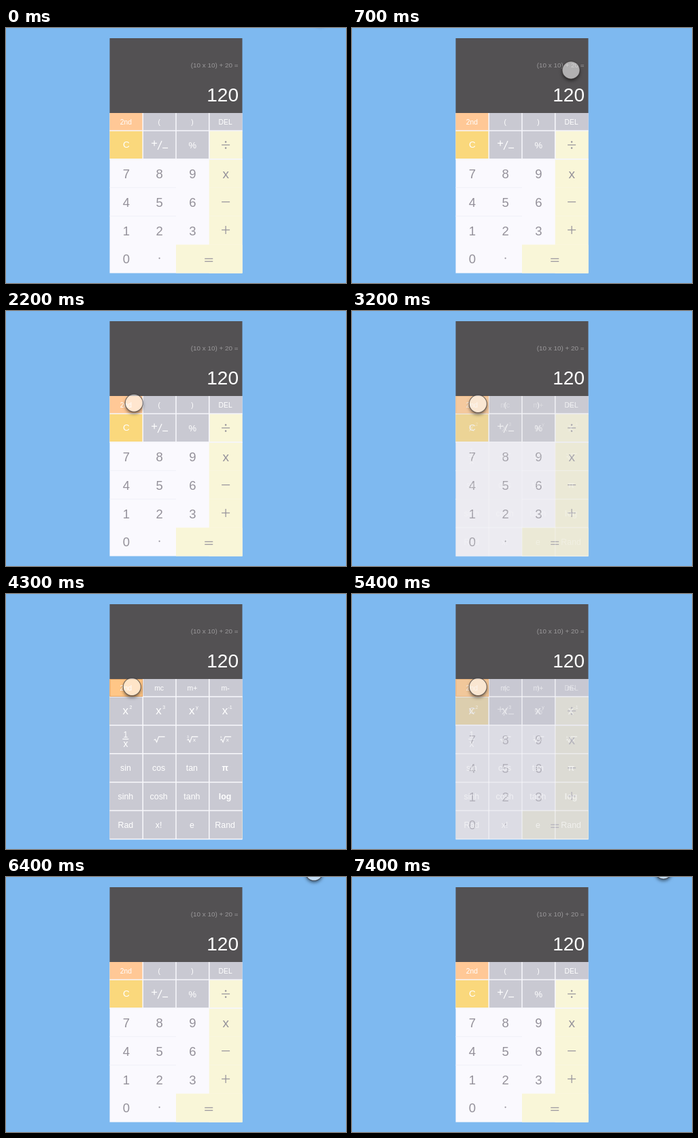
These frames come from a looping animation (500x375 px, 7.5 s). An HTML page with a canvas:

```html
<!DOCTYPE html>
<html lang="en">
<head>
<meta charset="utf-8">
<title>Calculator</title>
<style>
html, body { margin: 0; height: 100%; overflow: hidden; background: #7eb9f0; }
canvas { display: block; }
</style>
</head>
<body>
<canvas id="stage" width="500" height="375"></canvas>
<script>
const ctx = document.getElementById('stage').getContext('2d');
const LOOP = 7500, STEP = 100;
const SKY = '#7eb9f0', SCREEN = '#535153', GREY = '#c9c9d2', ORANGE = '#ffc896';
const GOLD = '#fad87c', YELLOW = '#f9f6d8', PALE = '#faf9fe', INK = '#94919a', WHITE = '#fff';

// Keypad grid: four equal columns, a low first row and five tall rows
const LEFT = 152.5, RIGHT = 347.5, TOP = 125, BOTTOM = 360.5;
const colX = c => LEFT + c * (RIGHT - LEFT) / 4;
const rowY = r => r ? 151 + (r - 1) * (BOTTOM - 151) / 5 : TOP;
const midX = c => colX(c + 0.5);
const midY = r => (rowY(r) + rowY(r + 1)) / 2;

function box(x, y, right, bottom, color) {
  ctx.fillStyle = color;
  ctx.fillRect(x, y, right - x, bottom - y);
}

const cell = (c, r, color, cols = 1) => box(colX(c), rowY(r), colX(c + cols), rowY(r + 1), color);

function label(text, x, y, size, color = WHITE, weight = 400, align = 'center') {
  ctx.font = `${weight} ${size}px "Liberation Sans", Arial, sans-serif`;
  ctx.textAlign = align;
  ctx.fillStyle = color;
  ctx.fillText(text, x, y + size * 0.355);
}

// Each path is a polyline: [x, y, x, y, ...]
function lines(color, width, ...paths) {
  ctx.strokeStyle = color;
  ctx.lineWidth = width;
  ctx.beginPath();
  for (const p of paths)
    for (let i = 0; i < p.length; i += 2) ctx[i ? 'lineTo' : 'moveTo'](p[i], p[i + 1]);
  ctx.stroke();
}

function dot(x, y, r, color) {
  ctx.fillStyle = color;
  ctx.beginPath();
  ctx.arc(x, y, r, 0, 7);
  ctx.fill();
}

const dash = (x, y, half = 6, color = INK) => lines(color, 1.2, [x - half, y, x + half, y]);

function plus(x, y, half = 6, color = INK) {
  dash(x, y, half, color);
  lines(color, 1.2, [x, y - half, x, y + half]);
}

function gridLines(color, width, firstRow, lastRow) {
  for (let c = 1; c < 4; c++) lines(color, width, [colX(c), rowY(firstRow), colX(c), rowY(lastRow)]);
  for (let r = firstRow + 1; r <= lastRow; r++) lines(color, width, [LEFT, rowY(r), RIGHT, rowY(r)]);
}

function drawScreen() {
  box(0, 0, 500, 375, SKY);
  box(LEFT, 15, RIGHT, TOP, SCREEN);
  label('(10 x 10) + 20 =', 341.5, 54.5, 9.9, '#9b999b', 400, 'right');
  label('120', 342, 98, 28, WHITE, 400, 'right');
}

function drawBasicKeys() {
  box(LEFT, TOP, RIGHT, BOTTOM, PALE);
  for (let c = 0; c < 4; c++) {
    cell(c, 0, c ? GREY : ORANGE);
    cell(c, 1, c ? GREY : GOLD);
  }
  for (let r = 1; r < 6; r++) cell(3, r, YELLOW);
  cell(2, 5, YELLOW, 2);
  gridLines('#f6f6fb', 1.6, 0, 2);
  lines('#f0f1f8', 1, ...[3, 4].map(r => [LEFT, rowY(r), colX(2), rowY(r)]));

  ['2nd', '(', ')', 'DEL'].forEach((s, c) => label(s, midX(c) - 0.5, midY(0), 10.3));
  label('C', midX(0), midY(1) - 0.5, 13.5);
  const x = midX(1), y = midY(1);
  plus(x - 7.5, y - 2.5, 4, WHITE);
  lines(WHITE, 1.2, [x - 2.5, y + 7, x + 3.5, y - 6]);
  dash(x + 8.5, y + 4.5, 4, WHITE);
  label('%', midX(2), y + 0.5, 13);

  for (let n = 1; n < 10; n++)
    label(n, midX((n - 1) % 3), midY(5 - Math.ceil(n / 3)) + 0.3, 18.5, INK);
  label('0', midX(0), midY(5), 18.5, INK);
  dot(midX(1), midY(5) - 1, 1.1, INK);

  dash(midX(3), y);
  for (const side of [-1, 1]) {
    dot(midX(3), y + 4.5 * side, 1.2, INK);
    dash(colX(3) - 0.5, midY(5) + 1.7 + 2 * side);
  }
  label('x', midX(3), midY(2), 19, INK);
  dash(midX(3), midY(3));
  plus(midX(3), midY(4) - 0.7);
}

function drawRoot(x, y, index) {
  lines(WHITE, 1.1, [x - 8, y + 1, x - 6, y, x - 4, y + 4, x - 1, y - 4, x + 8, y - 4]);
  if (!index) return;
  label(index, x - 7, y - 4, 5);
  label('x', x + 2.5, y + 0.5, 8);
}

function drawScienceKeys() {
  box(LEFT, TOP, RIGHT, BOTTOM, GREY);
  gridLines('#f8f8fc', 1.5, 0, 6);
  cell(0, 0, '#ffc686');
  ctx.strokeStyle = '#e0a468';
  ctx.lineWidth = 1;
  ctx.strokeRect(LEFT + 0.5, TOP + 0.5, 47.5, 25);

  ['2nd', 'mc', 'm+', 'm-'].forEach((s, c) => label(s, midX(c) - 0.5, midY(0), 10.5));
  ['2', '3', 'y', '-1'].forEach((s, c) => {
    label('x', midX(c) - 1.2, midY(1) - 0.5, 17);
    label(s, midX(c) + 6.5, midY(1) - 5.5, 7);
  });
  const y = midY(2);
  label('1', midX(0) - 1, y - 7, 12);
  dash(midX(0) - 1, y - 0.5, 4.5, WHITE);
  label('x', midX(0) - 1, y + 6, 14);
  ['', '3', 'x'].forEach((s, i) => drawRoot(midX(i + 1), y, s));
  ['sin cos tan π', 'sinh cosh tanh log', 'Rad x! e Rand'].forEach((row, r) =>
    row.split(' ').forEach((s, c) =>
      label(s, midX(c) - 1, midY(r + 3), 12.4, WHITE, /π|log/.test(s) ? 700 : 400)));
}

function drawPointer({ x, y }) {
  ctx.save();
  ctx.beginPath();
  ctx.rect(0, 0, 500, 375);
  ctx.arc(x, y, 13, 0, 7);
  ctx.clip('evenodd');
  ctx.shadowColor = 'rgba(0,0,0,.55)';
  ctx.shadowBlur = 5;
  ctx.shadowOffsetY = 3;
  dot(x, y, 12.6, '#444');
  ctx.restore();
  dot(x, y, 13, 'rgba(255,255,255,.55)');
  ctx.strokeStyle = 'rgba(50,46,46,.65)';
  ctx.lineWidth = 1.1;
  ctx.beginPath();
  ctx.arc(x, y, 13, 0, 7);
  ctx.stroke();
}

const progress = (t, start, end) => Math.min(1, Math.max(0, (t - start) / (end - start)));
const easeOut = (p, power = 3) => 1 - (1 - p) ** power;
const easeIn = p => p ** 1.7;

function pointerAt(t) {
  const enter = easeOut(progress(t, 400, 1600), 2.8);
  const reach = easeOut(progress(t, 1800, 2600));
  const leave = progress(t, 5800, 6600);
  const drift = progress(t, 7300, 7700);
  return {
    x: 462 - 253 * enter - 23.7 * reach + 272 * easeOut(leave) + 3 * drift,
    y: -18 + 144.5 * enter + 10 * reach - 144.5 * easeOut(leave, 4.4) - 8 * drift
  };
}

function draw(t) {
  drawScreen();
  drawBasicKeys();
  ctx.globalAlpha = easeIn(progress(t, 2900, 3500)) - easeIn(progress(t, 5100, 5600));
  drawScienceKeys();
  ctx.globalAlpha = 1;
  drawPointer(pointerAt(t));
}

const began = performance.now();
function tick() {
  const t = (performance.now() - began) % LOOP;
  draw(Math.floor(t / STEP) * STEP);
  requestAnimationFrame(tick);
}
tick();
</script>
</body>
</html>
```
